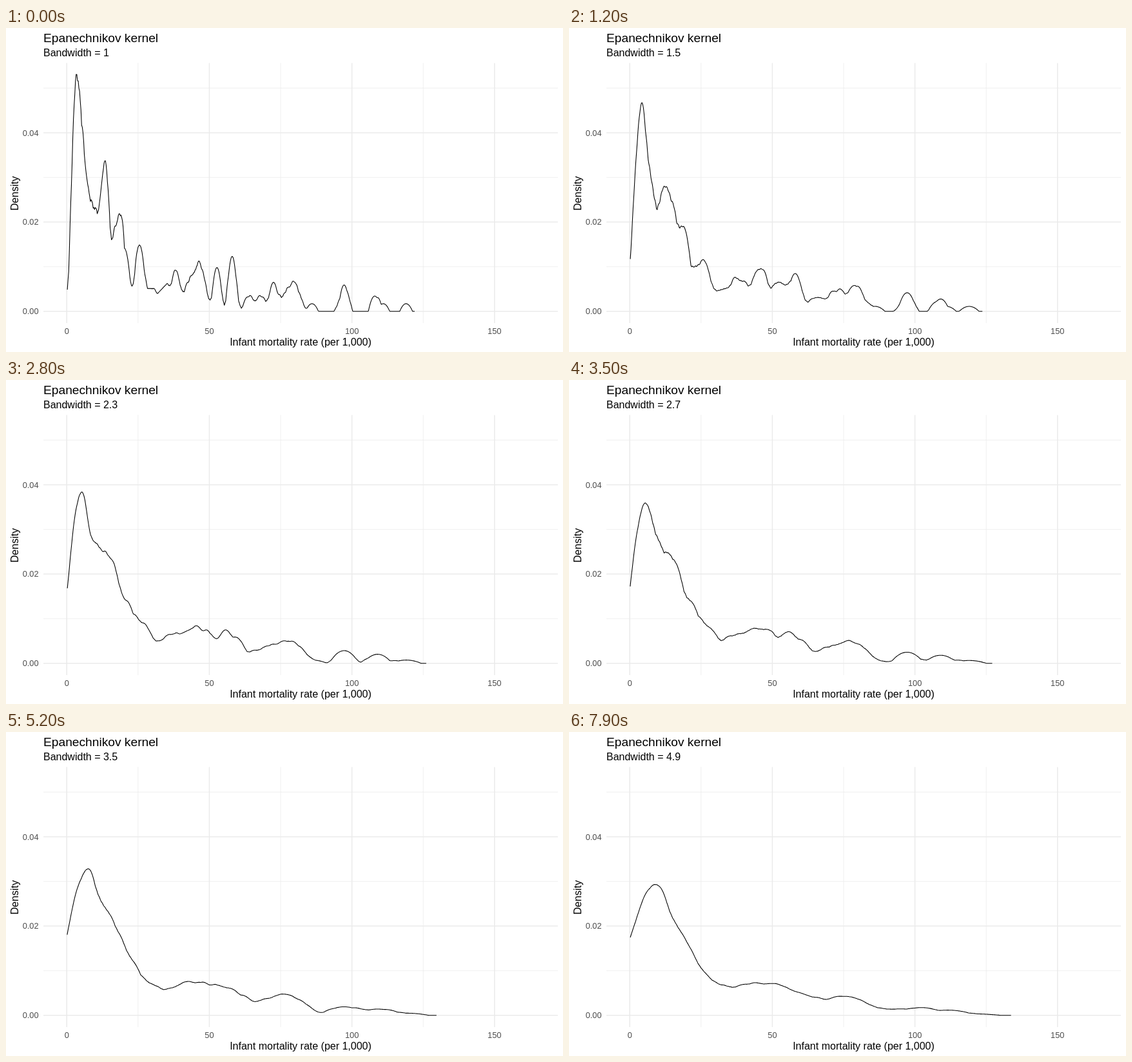
An HTML page for the animation above (8 s loop, 864 px wide and 504 px high).

```html
<!DOCTYPE html>
<html lang="en">
<head>
<meta charset="utf-8">
<title>Kernel density by bandwidth</title>
<style>
  html, body { margin: 0; width: 100%; height: 100%; overflow: hidden; background: #fff; }
  svg { display: block; width: 864px; height: 504px; }
  text { font-family: "Liberation Sans", Arial, Helvetica, sans-serif; font-size: 16px; }
  .tick { font-size: 12.8px; fill: #4d4d4d; }
  .major { stroke: #ebebeb; stroke-width: 1.55; }
  .minor { stroke: #ebebeb; stroke-width: 0.78; }
</style>
</head>
<body>
<svg viewBox="0 0 864 504">
  <g id="grid"></g>
  <path id="curve" fill="none" stroke="#000" stroke-width="1.07" stroke-linejoin="round"/>
  <text x="58" y="22" style="font-size:19.2px">Epanechnikov kernel</text>
  <text id="label" x="58" y="44"></text>
  <text x="457" y="494" text-anchor="middle">Infant mortality rate (per 1,000)</text>
  <text transform="translate(19.3 257.3) rotate(-90)" text-anchor="middle">Density</text>
</svg>
<script>
const FRAME_MS = 100, FRAMES = 80, GRID = 512;
const PANEL = { left: 58, right: 856, top: 54.4, bottom: 459 };
const px = v => 94.25 + 4.4235 * v;
const py = d => 440.7 - 6945 * d;

// How many countries share each whole-number rate, in runs from a starting rate.
const runs = [
  [2, [8, 14, 10, 7, 9, 6, 2, 7, 5, 2, 5, 9, 6, 5, 1, 2, 9, 1, 4, 4]],
  [23, [1, 1, 4, 4, 1, 1, 1, 1, 1, 1, 0, 2, 1, 1, 1, 2, 3]],
  [42, [2, 2, 0, 3, 2, 2, 2, 1, 0, 0, 2, 4]],
  [57, [2, 4, 2, 0, 0, 0, 1, 1, 0, 1, 0, 1, 1]],
  [72, [2, 2, 0, 0, 2, 0, 1, 2, 1, 1, 1, 0, 0, 0, 1]],
  [96, [1, 1, 2]],
  [108, [2, 0, 0, 1]],
  [119, [1]]
];
const data = runs.flatMap(([start, counts]) =>
  counts.map((n, i) => ({ rate: start + i, n }))).filter(p => p.n);
const total = data.reduce((sum, p) => sum + p.n, 0);
const min = data[0].rate, max = data[data.length - 1].rate;

function density(x, bw) {
  const reach = bw * Math.sqrt(5);
  let sum = 0;
  for (const p of data) {
    const u = (x - p.rate) / reach;
    if (u > -1 && u < 1) sum += p.n * (1 - u * u);
  }
  return 0.75 * sum / (reach * total);
}

// Curve on an even grid reaching 3 bandwidths past the data, kept where x > 0.
function curveAt(bw) {
  const from = min - 3 * bw, to = max + 3 * bw;
  const step = (to - from) / (GRID - 1);
  const start = from + step * Math.max(0, Math.floor(-from / step) + 1);
  return Array.from({ length: GRID }, (_, i) => {
    const x = start + (to - start) * i / (GRID - 1);
    return [x, density(x, bw)];
  });
}

const cache = new Map();
function state(i) {
  if (!cache.has(i)) cache.set(i, curveAt(1 + i / 10));
  return cache.get(i);
}

function drawGrid() {
  const parts = [];
  const line = (cls, x1, y1, x2, y2) =>
    parts.push(`<line class="${cls}" x1="${x1}" y1="${y1}" x2="${x2}" y2="${y2}"/>`);
  const across = (cls, d) => line(cls, PANEL.left, py(d), PANEL.right, py(d));
  const down = (cls, v) => line(cls, px(v), PANEL.top, px(v), PANEL.bottom);
  const tick = (x, y, anchor, text) =>
    parts.push(`<text class="tick" x="${x}" y="${y}" text-anchor="${anchor}">${text}</text>`);

  [0.01, 0.03, 0.05].forEach(d => across("minor", d));
  [25, 75, 125].forEach(v => down("minor", v));
  [0, 0.02, 0.04].forEach(d => {
    across("major", d);
    tick(50.6, py(d) + 4.6, "end", d.toFixed(2));
  });
  [0, 50, 100, 150].forEach(v => {
    down("major", v);
    tick(px(v), 475.6, "middle", v);
  });
  document.getElementById("grid").innerHTML = parts.join("");
}

const curve = document.getElementById("curve");
const label = document.getElementById("label");
let shown = -1;

// Each bandwidth takes two frames: the state itself, then a blend halfway to the next.
function draw(frame) {
  if (frame === shown) return;
  shown = frame;
  const pos = Math.max(0, (frame - 1) / 2);
  const index = Math.floor(pos), mix = pos - index;
  const a = state(index), b = mix ? state(index + 1) : a;
  const blend = (p, q) => p + (q - p) * mix;
  curve.setAttribute("d", "M" + a.map(([x, d], i) =>
    px(blend(x, b[i][0])).toFixed(2) + " " + py(blend(d, b[i][1])).toFixed(2)).join("L"));
  label.textContent = "Bandwidth = " + (10 + index) / 10;
}

let begin = null;
function tickFrame(now) {
  if (begin === null) begin = now;
  draw(Math.floor((now - begin) / FRAME_MS) % FRAMES);
  requestAnimationFrame(tickFrame);
}

drawGrid();
draw(0);
requestAnimationFrame(tickFrame);
</script>
</body>
</html>
```
